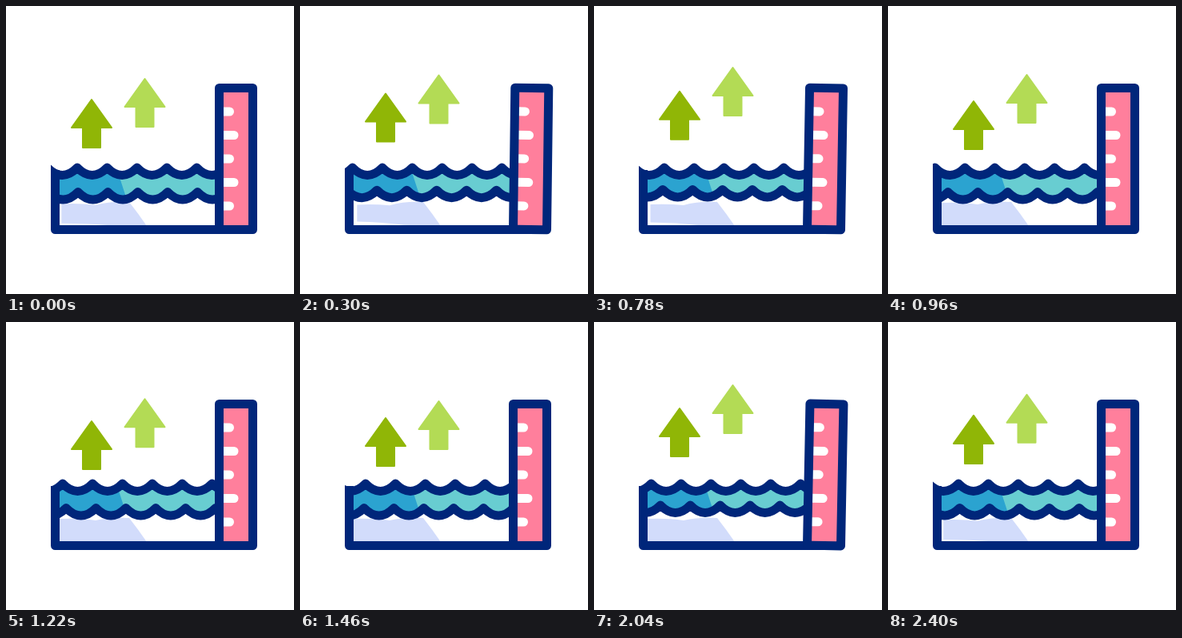
An HTML page with a canvas that plays this animation: 360 px wide and 360 px high, repeating every 2.42 s.

```html
<!DOCTYPE html>
<html>
<head>
<meta charset="utf-8">
<style>
html, body { margin: 0; width: 100%; height: 100%; overflow: hidden; background: #fff; }
canvas { display: block; }
</style>
</head>
<body>
<canvas id="stage" width="360" height="360"></canvas>
<script>
const ctx = document.getElementById('stage').getContext('2d');
const LOOP = 2420, WAVE = 37.35, NAVY = '#00267a';

// Key times shared by every swaying part, and the value of each part there
const times = [0, 290, 580, 960, 1210, 1460, 1660, 1850, 2040];
const keys = {
  leftArrow:  [116, 109, 95, 118, 123, 119, 106, 100, 107],
  rightArrow: [90, 86, 70, 85, 95, 98, 84, 75.5, 78],
  lean:       [0, 2.2, 6, 0, 0, 0, 4.5, 5.6, 3.5],
  lowerX:     [90, 96, 98, 75, 75, 80, 95, 92, 83],
  shrink:     [0.35, 0.6, 1, 0, 0, 0, 0, 0, 0]
};

// Smooth cyclic curve through the keys
function sway(values, t) {
  const n = times.length;
  const at = i => times[(i + n) % n] + LOOP * Math.floor(i / n);
  const val = i => values[(i + n) % n];
  const slope = i => (val(i + 1) - val(i - 1)) / (at(i + 1) - at(i - 1));
  let i = n - 1;
  while (times[i] > t) i--;
  const d = at(i + 1) - at(i), u = (t - at(i)) / d, v = 1 - u;
  return v * v * ((1 + 2 * u) * val(i) + u * d * slope(i)) +
         u * u * ((3 - 2 * u) * val(i + 1) - v * d * slope(i + 1));
}

function polygon(points, color) {
  ctx.beginPath();
  points.forEach(([x, y]) => ctx.lineTo(x, y));
  ctx.closePath();
  ctx.fillStyle = color;
  ctx.fill();
}

function arrow(x, y, color) {
  polygon([[x, y + 1], [x + 25, y + 36], [x + 11, y + 36], [x + 11, y + 61],
    [x - 11, y + 61], [x - 11, y + 36], [x - 25, y + 36]], color);
  ctx.strokeStyle = color;
  ctx.lineWidth = 2;
  ctx.stroke();
}

// Scalloped line whose crests stand at crestX plus whole wavelengths
function wavePath(crestX, y) {
  const path = new Path2D();
  let x = 20 + (crestX - 20) % WAVE - WAVE;
  path.moveTo(x, y);
  for (; x < 300; x += WAVE) path.quadraticCurveTo(x + WAVE / 2, y + 19, x + WAVE, y);
  return path;
}

function strokeWave(path) {
  ctx.strokeStyle = NAVY;
  ctx.lineWidth = 11;
  ctx.stroke(path);
}

function water(t, lean) {
  const upper = wavePath(89 + 3 * WAVE * t / LOOP, 202);
  const lowerY = 232.5 - lean;
  const lower = wavePath(sway(keys.lowerX, t), lowerY);
  const body = new Path2D(lower);
  body.lineTo(340, 100);
  body.lineTo(-20, 100);

  ctx.save();
  ctx.beginPath();
  ctx.rect(56, 150, 211, 130);
  ctx.clip();

  ctx.save();
  ctx.clip(body);
  ctx.beginPath();
  ctx.rect(60, 209, 210, 60);
  ctx.clip();
  ctx.fillStyle = '#68cdd1';
  ctx.fillRect(60, 209, 210, 60);
  polygon([[60, 205], [139, 205], [152, 245], [60, 245]], '#2ba3d0');
  ctx.restore();

  strokeWave(lower);
  strokeWave(upper);
  ctx.restore();
}

function shade(t) {
  const s = Math.max(0, sway(keys.shrink, t)), left = 67 + 7 * s;
  ctx.beginPath();
  ctx.moveTo(left, 246 + 4 * s);
  ctx.quadraticCurveTo(92, 245 + 4 * s, 112, 248 + 2 * s);
  ctx.quadraticCurveTo(130, 244, 154, 245);
  ctx.quadraticCurveTo(165, 259, 176, 275);
  ctx.lineTo(130, 275 - 2 * s);
  ctx.quadraticCurveTo(105, 275 - 8 * s, left, 275 - 9 * s);
  ctx.fillStyle = '#d2dcfb';
  ctx.fill();
}

function ruler(lean) {
  ctx.save();
  ctx.translate(288, 280);
  ctx.rotate(lean / 180);
  ctx.translate(-288, -280);
  ctx.fillStyle = '#ff7f9c';
  ctx.fillRect(267, 103, 42, 176);
  ctx.strokeStyle = '#fff';
  ctx.lineWidth = 11;
  ctx.lineCap = 'round';
  for (let i = 0; i < 5; i++) {
    const y = 132 + i * 29.5;
    ctx.beginPath();
    ctx.moveTo(270, y);
    ctx.lineTo(i % 2 ? 285 : 279.5, y);
    ctx.stroke();
  }
  ctx.strokeStyle = NAVY;
  ctx.strokeRect(266.5, 102.5, 42, 177);
  ctx.restore();
}

function draw(t) {
  const lean = Math.max(0, sway(keys.lean, t));
  ctx.fillStyle = '#fff';
  ctx.fillRect(0, 0, 360, 360);
  ctx.lineJoin = 'round';
  arrow(107, sway(keys.leftArrow, t), '#90b606');
  arrow(173.5, sway(keys.rightArrow, t), '#b3db55');
  shade(t);
  water(t, lean);
  ctx.strokeStyle = NAVY;
  ctx.lineWidth = 11;
  ctx.beginPath();
  ctx.moveTo(61.5, 205);
  ctx.lineTo(61.5, 279.5);
  ctx.lineTo(308, 279.5);
  ctx.stroke();
  ruler(lean);
}

function tick() {
  draw(performance.now() % LOOP);
  requestAnimationFrame(tick);
}
tick();
</script>
</body>
</html>
```
